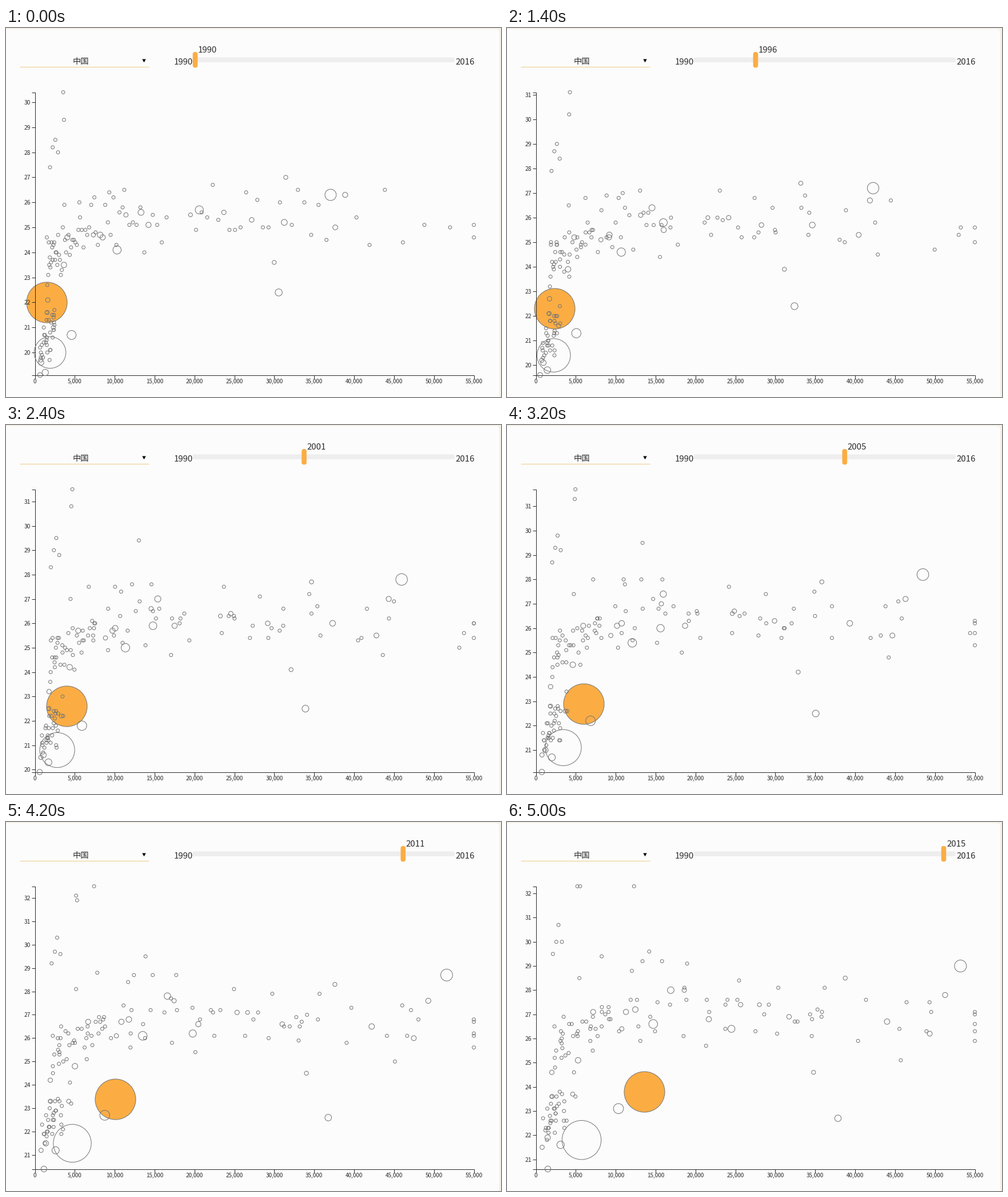
A matplotlib script for the animation above (5.2 s loop, 866 by 646 pixels).

```python
import numpy as np
import matplotlib.pyplot as plt
from matplotlib.animation import FuncAnimation
from matplotlib.collections import LineCollection
from matplotlib.patches import FancyBboxPatch, Polygon

W, H, DPI = 866, 646, 64
PX = 72 / DPI
LEFT, RIGHT, TOP, BOTTOM = 50.5, 818.5, 112.5, 607.5
FIRST, LAST, CAP = 1990, 2015, 55
ORANGE, INK, STROKE = "#fbad44", "#2b2b2b", "#747474"
SMALL = 2.9

# Year shown at each 200 ms step
YEARS = [1990, *range(1990, 2008), *range(2009, 2016)]

# Year, lowest and highest index on the vertical axis
SCALE = np.array([(1990, 19.1, 30.4), (1993, 19.4, 30.8), (2001, 19.9, 31.5),
                  (2004, 20.1, 31.7), (2009, 20.3, 31.9), (2010, 20.4, 32.5),
                  (2015, 20.6, 32.3)])

# Income and index at three key years, first and last radius
KEYS = [1990, 2001, 2015]
MAIN = [
    ((1.5, 3.97, 13.57), (22.0, 22.6, 23.8), 35.5, 35.5),
    ((1.9, 2.8, 5.73), (20.0, 20.8, 21.8), 27.7, 34.2),
    ((37.05, 45.95, 53.2), (26.3, 27.8, 29.0), 9.9, 10.5),
    ((30.55, 33.9, 37.85), (22.4, 22.5, 22.7), 6.2, 5.7),
    ((4.6, 5.9, 10.35), (20.7, 21.8, 23.1), 7.9, 8.8),
    ((10.3, 11.35, 14.7), (24.1, 25.0, 26.6), 7.2, 7.7),
    ((20.6, 14.8, 24.5), (25.7, 25.9, 26.4), 7.1, 6.2),
    ((13.3, 15.4, 16.9), (25.6, 27.0, 28.0), 5.2, 5.8),
    ((31.25, 37.3, 44.0), (25.2, 26.0, 26.7), 5.2, 4.8),
    ((1.3, 1.7, 3.1), (19.2, 20.3, 21.6), 5.6, 6.5),
    ((0.65, 0.6, 1.5), (19.0, 19.8, 20.5), 4.2, 5.2),
    ((3.55, 4.7, 5.2), (30.5, 31.5, 32.3), SMALL, SMALL),
    ((3.65, 4.57, 5.55), (29.3, 30.8, 32.3), SMALL, SMALL),
]


def crowd():
    """Columns: first year, start income and index, end income and index, radius."""
    rng = np.random.default_rng(12)

    def group(x0, y0, growth, gain, big=0.15):
        n = len(x0)
        r = np.where(rng.random(n) < big, rng.uniform(3.4, 5, n), SMALL)
        x1 = x0 * rng.uniform(*growth, n)
        y1 = y0 + rng.uniform(*gain, n)
        return np.column_stack([np.full(n, FIRST), x0, y0, x1, y1, r])

    u = np.linspace(0, 1, 36)
    poor = group(0.4 + 0.9 * u + rng.uniform(0, 1.5, 36), 19.6 + 2.1 * u,
                 (1.0, 2.2), (1.7, 2.9))

    u = np.linspace(0, 1, 66)
    x = 1.5 * 11 ** u
    y = 23.0 + 0.9 * np.log(x) + rng.normal(0, 0.6, 66)
    middle = group(x, y, (1.2, 2.2), (1.6, 2.6))

    u = np.linspace(0, 1, 34)
    x = 19.5 + 23 * u + 18 * u ** 8
    rich = group(x, 25.2 + rng.normal(0, 0.85, 34), (1.05, 1.45), (0.8, 2.0), 0.25)

    # Islands high above the trend, then dots between them and the crowd
    u = np.linspace(0, 1, 4)
    islands = group(1.9 + u, 27.4 + 1.1 * np.sin(2.6 * u), (1.05, 1.3), (1.4, 2.3), 0)
    u = np.linspace(0, 1, 5)
    between = group(3.7 + 7.5 * u, 25.9 + 0.6 * u, (1.3, 1.8), (2.3, 3.4))

    late = [(2000, 12.95, 29.4, 14.2, 29.6, SMALL), (2010, 6.2, 32.5, 12.3, 32.3, SMALL)]
    return np.vstack([poor, middle, rich, islands, between, late])


PATHS = [(np.polyfit(np.subtract(KEYS, FIRST), xs, 2),
          np.polyfit(np.subtract(KEYS, FIRST), ys, 2), r0, r1)
         for xs, ys, r0, r1 in MAIN]
CROWD = crowd()


def scale(year):
    return [round(np.interp(year, SCALE[:, 0], SCALE[:, k]), 1) for k in (1, 2)]


def to_x(income):
    return LEFT + np.minimum(income, CAP) * (RIGHT - LEFT) / CAP


def to_y(index, low, high):
    return BOTTOM - (index - low) * (BOTTOM - TOP) / (high - low)


def place(year):
    """Rows of x, y and radius in pixels."""
    age = year - FIRST
    main = [(np.polyval(px, age), np.polyval(py, age), r0 + (r1 - r0) * age / (LAST - FIRST))
            for px, py, r0, r1 in PATHS]
    since, x0, y0, x1, y1, r = CROWD[CROWD[:, 0] <= year].T
    t = (year - since) / (LAST - since)
    rest = np.column_stack([x0 + (x1 - x0) * t, y0 + (y1 - y0) * t, r])
    dots = np.vstack([main, rest])
    low, high = scale(year)
    dots[:, 0] = to_x(dots[:, 0])
    dots[:, 1] = to_y(np.clip(np.round(dots[:, 1], 1), low, high), low, high)
    return dots


plt.rcParams["font.family"] = "Noto Sans CJK JP"
fig = plt.figure(figsize=(W / DPI, H / DPI), dpi=DPI, facecolor="#f5f0e6")
ax = fig.add_axes([0, 0, 1, 1])
ax.set_xlim(0, W)
ax.set_ylim(H, 0)
ax.axis("off")


def box(x, y, w, h, r, color, z):
    patch = FancyBboxPatch((x, y), w, h, boxstyle=f"round,pad=0,rounding_size={r}",
                           fc=color, ec="none", zorder=z)
    return ax.add_patch(patch)


def label(x, y, s, size, ha="left"):
    return ax.text(x, y, s, fontsize=size * PX, color=INK, ha=ha, va="baseline", zorder=6)


def line(xs, ys, color=INK):
    ax.plot(xs, ys, color=color, lw=PX, zorder=3, solid_capstyle="butt")


def circles(color, z):
    return ax.scatter([], [], facecolors=color, edgecolors=STROKE,
                      linewidths=PX, zorder=z)


# Card, menu and slider
box(-20, 2, 883, 680, 6, "#fcfcfc", 0)
line([24, 249.5], [67.5, 67.5], "#f0c987")
label(131, 63, "中国", 14.3, "center")
ax.add_patch(Polygon([(238.3, 54.5), (244.7, 54.5), (241.5, 60.3)], fc="black", ec="none"))
box(326, 51.5, 459, 8.5, 4, "#eeeeee", 1)
label(294, 64, "1990", 15)
label(786, 64, "2016", 15)
knob = box(327, 42, 8.6, 27.4, 4, ORANGE, 4)
year_text = label(336, 43, "1990", 15)

# Axes
line([LEFT - 6, LEFT, LEFT, LEFT - 6], [TOP, TOP, BOTTOM, BOTTOM])
line([LEFT, RIGHT], [BOTTOM, BOTTOM])
for k in range(0, CAP + 1, 5):
    line([to_x(k)] * 2, [BOTTOM, BOTTOM + 6])
    label(to_x(k), 622, f"{k * 1000:,}", 9.9, "center")
y_ticks = ax.add_collection(LineCollection([], colors=INK, linewidths=PX, zorder=3))
y_labels = [label(43, 0, "", 10.2, "right") for _ in range(14)]

chosen = circles(ORANGE, 2)
others = circles("none", 5)


def set_circles(coll, rows):
    coll.set_offsets(rows[:, :2])
    coll.set_sizes((2 * rows[:, 2] * PX) ** 2)


def draw(frame):
    year = YEARS[frame]
    x = 331 + 17.32 * (year - FIRST)
    knob.set_x(x - 4.3)
    year_text.set_x(x + 5)
    year_text.set_text(str(year))

    low, high = scale(year)
    values = np.arange(np.ceil(low), np.floor(high) + 1)
    rows = to_y(values, low, high)
    y_ticks.set_segments([[(LEFT - 6, y), (LEFT, y)] for y in rows])
    for text in y_labels:
        text.set_text("")
    for text, v, y in zip(y_labels, values, rows):
        text.set_text(f"{v:.0f}")
        text.set_y(y + 4)

    dots = place(year)
    set_circles(chosen, dots[:1])
    set_circles(others, dots[1:])
    return []


anim = FuncAnimation(fig, draw, frames=len(YEARS), interval=200,
                     repeat=True, repeat_delay=0, blit=False)
plt.show()
```
